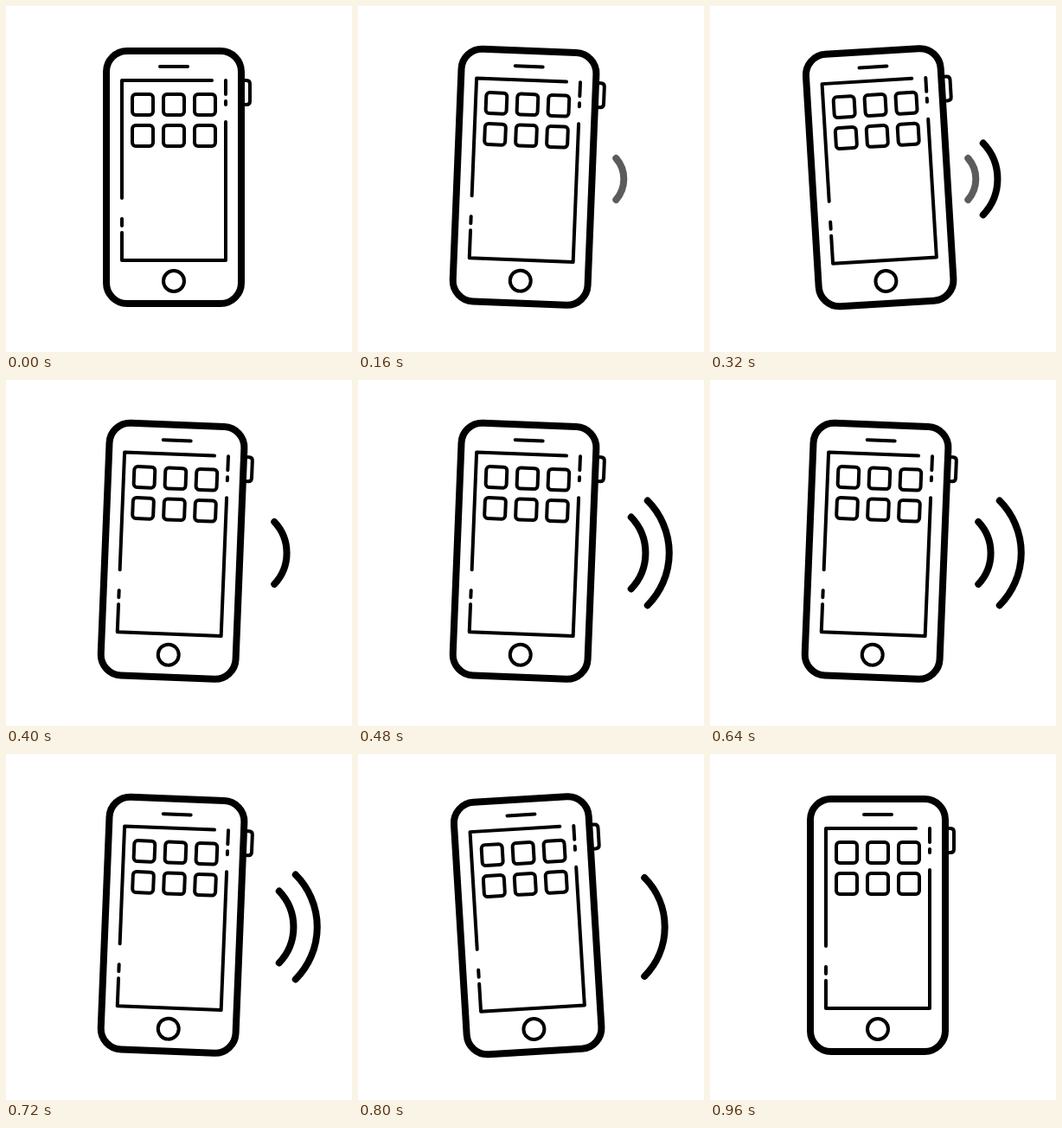
These frames come from a looping animation (400x400 px, 1.12 s). An HTML page:

```html
<!DOCTYPE html>
<html lang="en">
<head>
<meta charset="utf-8">
<title>Ringing phone</title>
<style>
html, body { margin: 0; width: 100%; height: 100%; overflow: hidden; background: #fff; }
svg { display: block; width: 100%; height: 100%; }
</style>
</head>
<body>
<svg viewBox="0 0 400 400" fill="none" stroke="#000" stroke-width="4" stroke-linecap="round" stroke-linejoin="round">
  <g id="phone">
    <path d="M274 86h4q4 0 4 4v20q0 4-4 4h-4"/>
    <rect x="116" y="52" width="156" height="292" rx="24" stroke-width="8"/>
    <path d="M178 70h32M238 86H134V222M134 246v8M134 262v32H254V134M254 86v16M254 110v4"/>
    <g id="icons"></g>
    <circle cx="194" cy="318" r="12"/>
  </g>
  <g id="waves" stroke-width="8"></g>
</svg>
<script>
const LOOP = 1120, STEP = 40, START = 160, STEPS = 20;
const SWING = [2.3, 3.46, 2.3, -2.3, -3.46, -2.3];

// half: mean half height, amp: pulse size, from/to: visible steps
const WAVES = [
  { half: 23.2, amp: 2.4, shift: 0, from: 0, to: 5, color: '#5c5c5c' },
  { half: 40.1, amp: 4.1, shift: 4, from: 4, to: 14, color: '#000' },
  { half: 59.6, amp: 2.65, shift: 8, from: 8, to: 19, color: '#000' }
];

const $ = id => document.getElementById(id);

function add(parent, tag, attrs) {
  const el = document.createElementNS('http://www.w3.org/2000/svg', tag);
  for (const name in attrs) el.setAttribute(name, attrs[name]);
  return parent.appendChild(el);
}

for (let i = 0; i < 6; i++) {
  add($('icons'), 'rect', {
    x: 146 + 36 * (i % 3), y: 102 + 36 * Math.floor(i / 3),
    width: 24, height: 24, rx: 4
  });
}
for (const w of WAVES) w.el = add($('waves'), 'path', { stroke: w.color });

// Triangle wave over six steps, lowest at step 2, highest at step 5
const pulse = k => Math.abs(((k - 2) % 6 + 6) % 6 - 3) / -1.5 + 1;

function arc(h) {
  const bulge = 0.438 * h - 1.5;
  const r = (h * h + bulge * bulge) / (2 * bulge);
  return `M${274.3 + h} ${200 - h}A${r} ${r} 0 0 1 ${274.3 + h} ${200 + h}`;
}

function draw(now) {
  const k = Math.floor((now % LOOP - START) / STEP);
  const active = k >= 0 && k < STEPS;
  const angle = active ? SWING[k % 6] : 0;
  $('phone').setAttribute('transform', `rotate(${angle} 200 162)`);
  for (const w of WAVES) {
    const shown = k >= w.from && k <= w.to;
    w.el.setAttribute('d', shown ? arc(w.half + w.amp * pulse(k - w.shift)) : '');
  }
  requestAnimationFrame(draw);
}
draw(0);
</script>
</body>
</html>
```
